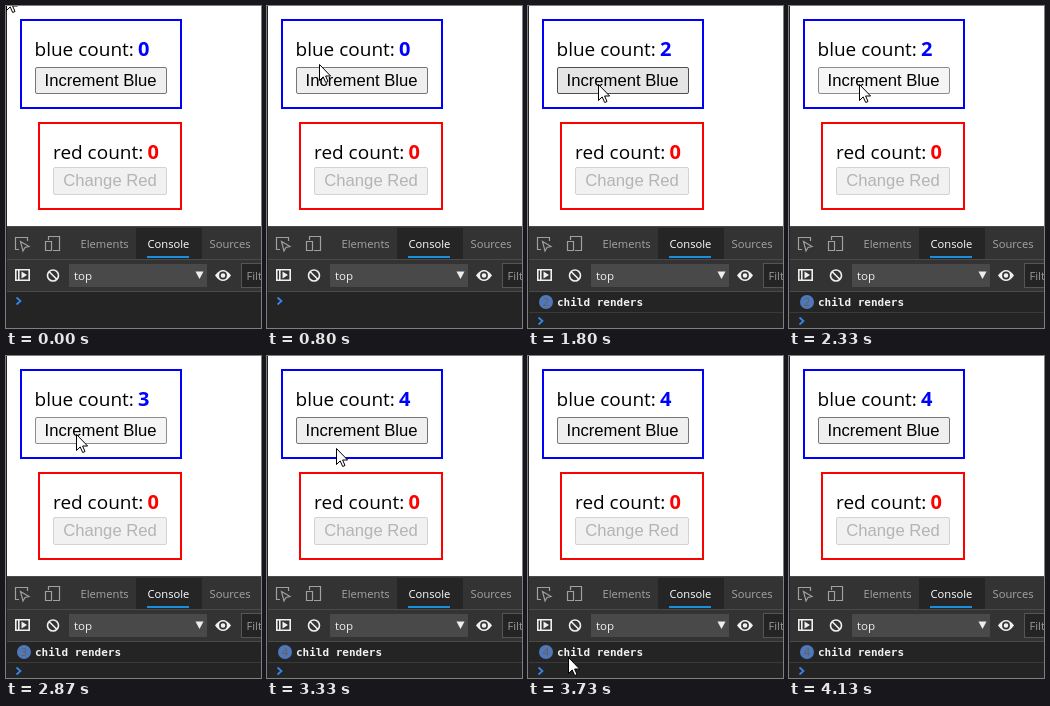
Write an HTML page that moves like this. It is 255x322 px and loops after 4.19 s.

```html
<!DOCTYPE html>
<html lang="en">
<head>
<meta charset="utf-8">
<title>Render counter</title>
<style>
html, body { margin: 0; width: 100%; height: 100%; overflow: hidden; background: #fff; }
svg { display: block; width: 255px; height: 322px; }
text { white-space: pre; }
.label { font: 19px "Open Sans", "Noto Sans", sans-serif; }
.count { font-weight: 700; font-size: 20px; }
.button { font: 16.67px "Liberation Sans", Arial, sans-serif; }
.tool { font: 11.2px "Open Sans", "Noto Sans", sans-serif; fill: #a5a5a5; }
.log { font: 700 11px "DejaVu Sans Mono", monospace; fill: #f2f2f2; }
.icon { fill: none; stroke: #a0a0a0; stroke-width: 1.2; }
.lit { stroke: #f0f0f0; stroke-width: 1.6; }
.rule { stroke: #4a4a4a; }
.cursor { fill: #fff; stroke: #000; stroke-linejoin: round; }
</style>
</head>
<body>
<svg viewBox="0 0 255 322">
  <rect width="255" height="322" fill="#fff"/>

  <rect x="15" y="14" width="160" height="88" fill="none" stroke="#00f" stroke-width="2"/>
  <text class="label" x="28.5" y="50">blue count:</text>
  <text class="label count" id="count" x="132" y="50" fill="#00f">0</text>
  <rect id="button" x="29.5" y="61.5" width="131" height="26" rx="1.5"/>
  <text class="button" x="38.5" y="80">Increment Blue</text>

  <rect x="33" y="117" width="142" height="86" fill="none" stroke="#f00" stroke-width="2"/>
  <text class="label" x="47" y="153">red count:</text>
  <text class="label count" x="141.5" y="153" fill="#f00">0</text>
  <rect x="47.5" y="161.5" width="113" height="27" rx="1.5" fill="#f1f1f1" stroke="#d2d2d2"/>
  <text class="button" x="57.3" y="180" fill="#b4b4b4">Change Red</text>

  <!-- developer tools -->
  <rect y="220" width="255" height="102" fill="#242424"/>
  <rect y="221" width="255" height="64" fill="#333"/>
  <rect id="deviceHover" x="33" y="225" width="28" height="25" fill="#4a4a4a"/>
  <path class="rule" d="M0 220.5H255M0 253.5H255M0 285.5H255"/>
  <rect x="130" y="222" width="66" height="31" fill="#252525"/>
  <rect x="141" y="250" width="42" height="2" fill="#1a8fe0"/>
  <text class="tool" x="74.5" y="242">Elements</text>
  <text class="tool" x="141.5" y="242" style="fill:#fff">Console</text>
  <text class="tool" x="203.5" y="242">Sources</text>

  <path class="icon" d="M13 243.5H9.5V231.5H21.5V235"/>
  <path class="icon" d="M14.5 235.5L23 240.5L19 241.5L17 245Z"/>
  <path class="icon" d="M42.5 234V230.5H53.5V244.5H47M39.5 235.5H45.5V244.5H39.5Z"/>
  <path class="icon lit" d="M9.8 263.8H23.2V274.2H9.8ZM12.8 263.8V274.2"/>
  <path d="M15.5 265.5L21 269L15.5 272.5Z" fill="#f0f0f0"/>
  <path class="icon lit" d="M41.5 269.5A5.5 5.5 0 1 1 52.5 269.5A5.5 5.5 0 1 1 41.5 269.5ZM43.2 265.7L50.8 273.3"/>
  <rect x="63" y="258" width="138" height="23" fill="#494949"/>
  <text class="tool" x="68" y="273.5" style="fill:#f0f0f0;font-size:11.6px">top</text>
  <path d="M189.500 265.500H197.500L193.500 273Z" fill="#eee"/>
  <path d="M209 269.5Q217 258.5 225 269.5Q217 280.5 209 269.5Z" fill="#f0f0f0"/>
  <circle cx="217" cy="269.5" r="3.1" fill="#f0f0f0" stroke="#333" stroke-width="1.6"/>
  <rect x="235.5" y="257.5" width="24" height="24" fill="#242424" stroke="#555"/>
  <text class="tool" x="240.5" y="273.5" style="fill:#999">Filter</text>

  <g id="message">
    <path class="rule" d="M0 306.5H255" stroke-opacity=".6"/>
    <g id="badge">
      <circle cx="18" cy="296" r="7" fill="#4f78bb"/>
      <text id="repeats" x="18" y="300" text-anchor="middle" class="tool" style="fill:#6b5d52"></text>
    </g>
    <text class="log" id="log" y="300">child renders</text>
  </g>
  <path id="prompt" d="M10.5 291.5L14.5 295L10.5 298.5" fill="none" stroke="#3687e8" stroke-width="1.7"/>

  <rect width="1" height="322" fill="#222"/>
  <path id="arrow" class="cursor" d="M.5 .5V16.5L4.2 12.9L6.7 18.5L9 17.5L6.6 12H11.6Z"/>
  <path id="hand" class="cursor" d="M-1.5 13V2Q-1.5 .5 0 .5T1.5 2V8Q3.8 6.5 4.5 8.7Q6.8 7.5 7.5 9.7Q10 9 10 11.5V15.5L8 20V22.5H-1V20L-5.5 14Q-6.5 11.5-4.5 11.5Z"/>
</svg>
<script>
const LOOP = 4190;
const $ = id => document.getElementById(id);

// time, x, y, shape
const path = [
  [0, 0, -12], [400, 2, -8], [470, 6, -1], [530, 13, 9], [600, 22, 20],
  [670, 32, 32], [730, 43, 45], [800, 52, 58], [870, 65, 71], [930, 68, 75],
  [1000, 70, 78], [3330, 69, 92], [3400, 67, 124], [3470, 64, 166],
  [3530, 60, 212], [3600, 59, 257, "hand"], [3670, 50, 286],
  [3730, 40, 301], [3800, 0, 0, "none"]
];
const clicks = [[1200, 1270], [1670, 1800], [2330, 2400], [2870, 3000]];
const buttonLooks = {
  normal: ["#efefef", "#767676"],
  hover: ["#e5e5e5", "#4f4f4f"],
  active: ["#f5f5f5", "#8d8d8d"]
};

const show = (id, on) => $(id).setAttribute("visibility", on ? "visible" : "hidden");

function draw(t) {
  const [, x, y, shape = "arrow"] = path.findLast(step => step[0] <= t);
  for (const id of ["arrow", "hand"]) {
    show(id, id === shape);
    $(id).setAttribute("transform", `translate(${x} ${y})`);
  }

  const count = clicks.filter(([, up]) => t >= up).length;
  const pressed = clicks.some(([down, up]) => t >= down && t < up);
  const look = pressed ? "active" : t >= 870 && t < 3330 ? "hover" : "normal";
  const [fill, stroke] = buttonLooks[look];
  $("button").setAttribute("fill", fill);
  $("button").setAttribute("stroke", stroke);
  $("count").textContent = count;

  const grouped = count > 1;
  show("message", count > 0);
  $("badge").style.display = grouped ? "" : "none";
  $("repeats").textContent = count;
  $("log").setAttribute("x", grouped ? 29 : 25);
  $("prompt").setAttribute("transform", `translate(0 ${count ? 20 : 0})`);

  show("deviceHover", t >= 3600 && t < 3670);
}

const start = performance.now();
function tick() {
  draw((performance.now() - start) % LOOP);
  requestAnimationFrame(tick);
}
tick();
</script>
</body>
</html>
```
